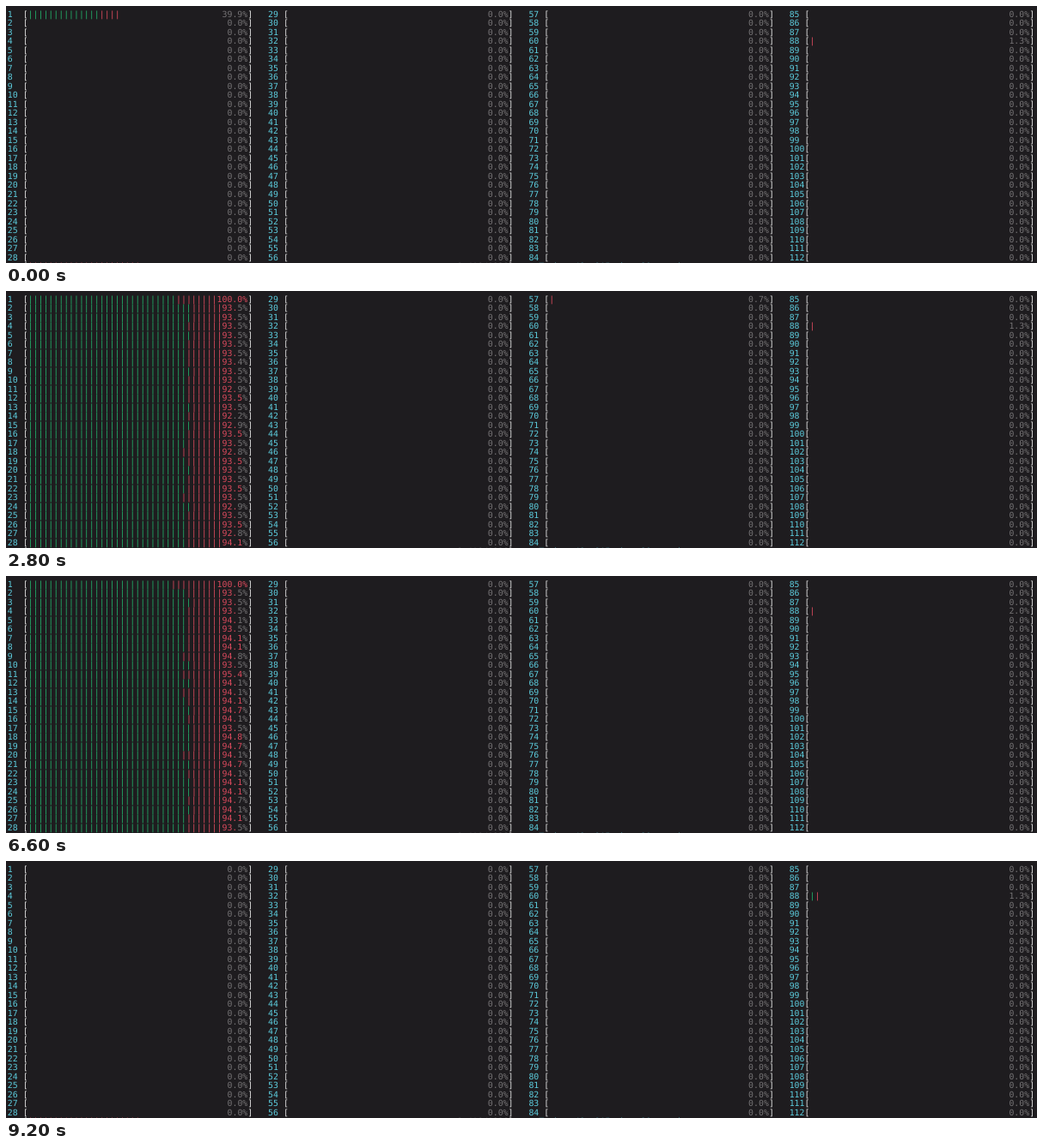
Recreate the animation shown at these times as an HTML page. Size 1200 by 300 pixels, loop 9.3 s.

```html
<!DOCTYPE html>
<html lang="en">
<head>
<meta charset="utf-8">
<title>CPU meters</title>
<style>
  html, body { margin: 0; width: 100%; height: 100%; overflow: hidden; background: #1e1c1f; }
  svg { display: block; width: 1200px; height: 300px; }
  text { font: 9.878px "DejaVu Sans Mono", "Liberation Mono", monospace; text-rendering: geometricPrecision; }
  .label { fill: #5ccbdc; }
  .edge { fill: #e4e4e4; }
  .user { fill: #22ae68; }
  .sys { fill: #da4a5d; }
  .value { fill: #757375; }
</style>
</head>
<body>
<svg id="stage" viewBox="0 0 1200 300"></svg>
<script>
const LOOP = 9300, FIRST = 900, PERIOD = 1500;
const CELL = 5.947, ROW = 10.52, LEFT = 1.8, TOP = 12.6;
const ROWS = 28, COLS = 4, STRIDE = 51, BAR = 43, MEMORY = 22;
const stage = document.getElementById('stage');

// A load is [user ticks, busy ticks, all ticks] of one sampling period.
// "group" is the typical load of the first column, "own" that of single cores.
const idle = [0, 0, 153];
const states = [
  { own: { 1: [48, 61, 153], 88: [0, 2, 153] } },
  { group: [62, 79, 153], own: { 1: [90, 129, 152], 88: [1, 3, 153] } },
  { group: [109, 143, 153], own: { 1: [101, 153, 153], 57: [0, 1, 153], 88: [0, 2, 153] } },
  { group: [109, 143, 153], own: { 1: [101, 153, 153], 57: [1, 2, 153], 88: [1, 2, 153] } },
  { group: [109, 144, 153], own: { 1: [98, 153, 153], 88: [0, 3, 153] } },
  { group: [47, 61, 151], own: { 1: [55, 77, 150], 19: [65, 80, 153], 88: [1, 3, 153] } },
  { own: { 88: [1, 2, 153] } }
];

const cellX = i => LEFT + i * CELL;
const rowY = r => TOP + r * ROW;

function addText(kind, cell, row, content = '') {
  const el = document.createElementNS('http://www.w3.org/2000/svg', 'text');
  el.setAttribute('class', kind);
  el.setAttribute('x', cellX(cell));
  el.setAttribute('y', rowY(row));
  el.textContent = content;
  stage.append(el);
  return el;
}

function put(el, cell, content) {
  el.setAttribute('x', cellX(cell));
  el.textContent = content;
}

// Seeded whole-number offset, spread evenly around zero.
function jitter(seed, spread) {
  let h = Math.imul(seed + 1, 0x9e3779b1);
  h = Math.imul(h ^ (h >>> 15), 0x85ebca6b);
  h = Math.imul(h ^ (h >>> 13), 0xc2b2ae35);
  const unit = ((h ^ (h >>> 16)) >>> 0) / 2 ** 32;
  return Math.round((unit * 2 - 1) * spread);
}

function loadOf(index, core) {
  const { group, own } = states[index];
  if (own[core]) return own[core];
  if (!group || core > ROWS) return idle;
  const seed = (index * ROWS + core) * 3;
  const [user, busy, all] = group;
  return [
    user + jitter(seed, user * 0.027),
    busy + jitter(seed + 1, 0.7),
    all + jitter(seed + 2, 0.7)
  ];
}

function makeMeter(core) {
  const row = (core - 1) % ROWS;
  const start = Math.floor((core - 1) / ROWS) * STRIDE;
  const bar = start + 4;
  addText('label', start, row, core);
  addText('edge', start + 3, row, '[');
  addText('edge', bar + BAR, row, ']');
  const userText = addText('user', bar, row);
  const sysText = addText('sys', bar, row);
  const valueText = addText('value', bar, row);

  return index => {
    const [user, busy, all] = loadOf(index, core);
    const cells = ticks => Math.ceil(ticks / all * BAR);
    const low = cells(user);
    const high = Math.min(BAR, low + cells(busy - user));
    const label = (busy / all * 100).toFixed(1) + '%';
    const labelAt = BAR - label.length;
    const covered = Math.max(0, high - labelAt);
    const bars = Math.min(high, labelAt) - low;
    put(userText, bar, '|'.repeat(low));
    put(sysText, bar + low, '|'.repeat(bars) + label.slice(0, covered));
    put(valueText, bar + labelAt + covered, label.slice(covered));
  };
}

const meters = Array.from({ length: ROWS * COLS }, (_, i) => makeMeter(i + 1));

// The next line only peeks in at the bottom edge.
addText('edge', 3, ROWS, '[');
addText('value', 88, ROWS, '9.41G/188G');
addText('edge', 98, ROWS, ']');
addText('label', 104, ROWS, 'Tasks: 48, 215 thr; 29 running');
const memory = addText('sys', 4, ROWS);

let shown = -1;
function draw(now) {
  const t = now % LOOP;
  const step = Math.floor((t - FIRST) / PERIOD) + 1;
  const index = Math.min(states.length - 1, step);
  if (index === shown) return;
  shown = index;
  meters.forEach(update => update(index));
  memory.textContent = '|'.repeat(states[index].group ? 0 : MEMORY);
}

const began = performance.now();
function tick() {
  draw(performance.now() - began);
  requestAnimationFrame(tick);
}
tick();
</script>
</body>
</html>
```
